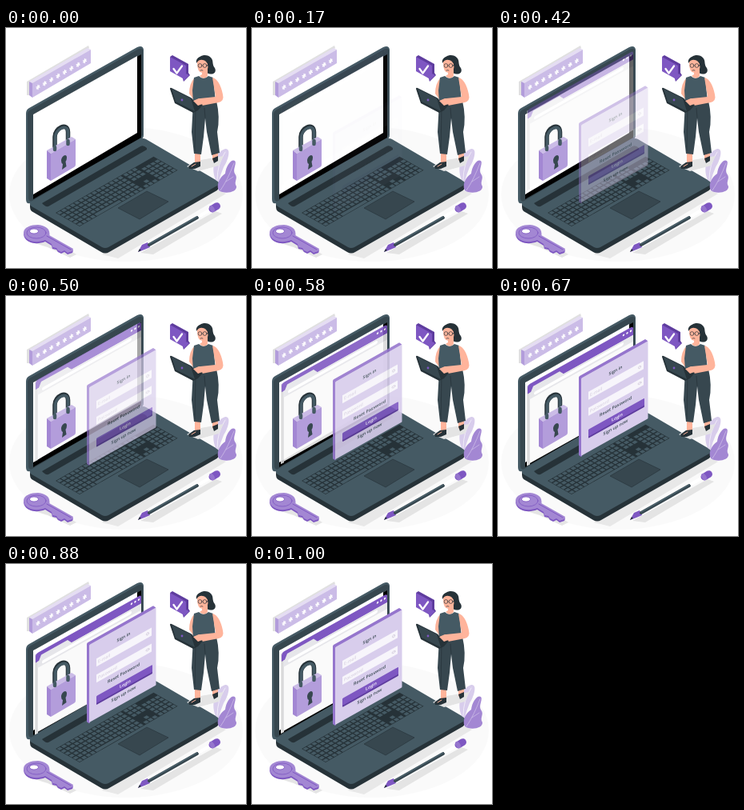
Animation of 300 by 300 pixels, one loop 1.04 s. Source, as an HTML page:

```html
<!DOCTYPE html>
<html lang="en">
<head>
<meta charset="utf-8">
<title>Secure sign in</title>
<style>
html, body { margin: 0; width: 100%; height: 100%; overflow: hidden; background: #fff; }
svg { display: block; width: 100vw; height: 100vh; }
text { font: 600 5.3px "Open Sans", Arial, sans-serif; text-anchor: middle; fill: #37474f; }
text.hint { font-weight: 400; text-anchor: start; fill: #d0c8da; }
.p { fill: #7e57c2; } .m { fill: #b39ddb; } .l { fill: #d8cdec; }
.g { fill: #455a64; } .d { fill: #37474f; } .k { fill: #263238; }
.s { fill: #ffb49b; } .w { fill: #fff; }
.line { fill: none; stroke-linecap: round; stroke-linejoin: round; }
</style>
</head>
<body>
<svg viewBox="0 0 300 300">
  <ellipse cx="150" cy="208" rx="146" ry="84" fill="#fafafa"/>

  <!-- password bar -->
  <path d="M26 67L103 22L104 25L29 84H26Z" fill="#e0e0e0"/>
  <path d="M29 67L102 25L106 27L33 69Z" fill="#e5ddf3"/>
  <path class="m" d="M29 67L33 69V87L29 84Z"/>
  <path d="M33 69L106 27V44L33 87Z" fill="#cbbce7"/>
  <g id="stars" class="line" stroke="#fff" stroke-width="1.3"></g>

  <!-- laptop -->
  <path d="M120 283L262 202L275 207L140 288Z" fill="#e8e8e8"/>
  <path class="k" d="M30 218L124 274L266 193V199Q266 202 262 204L129 280Q124 283 119 280L32 229Q30 227 30 224Z"/>
  <path class="g" d="M31 218L168 139Q171 137 175 139L264 191Q268 194 264 197L128 274Q124 276 120 274L32 223Q28 220 31 218Z"/>
  <path class="k" d="M45 219L168 148Q172 146 176 150L176 152L53 223Q49 224 45 219Z"/>
  <g transform="matrix(5.42 -3.11 5 2.85 62 231)">
    <rect class="k" width="22.600" height="6"/>
    <path id="keys" class="g"/>
  </g>
  <path class="d" d="M140 225L176 204L203 217L167 239Z" stroke="#263238" stroke-width=".6"/>
  <path class="g" d="M25 107Q25 102 29 100L164 24Q171 21 172 27V134Q172 138 168 140L33 218Q25 222 25 214Z"/>
  <path class="d" d="M27 108Q27 104 31 102L166 26Q171 24 171 29V134L33 216Q29 218 28 213Z"/>
  <path d="M34 108L169 33V137L34 214Z" fill="#000"/>
  <path class="w" d="M34 108L164 35V131L34 208Z"/>

  <!-- browser window -->
  <g id="page">
    <path d="M36 112L40 111V210L36 212Z" fill="#e0e0e0"/>
    <g transform="matrix(1 -.56 0 1 37 111)">
      <path d="M2 2H132V99H2Z" fill="#fafafa"/>
      <path d="M2 10V99" class="line" stroke="#c4c4c8" stroke-width=".7"/>
      <path class="p" d="M0 3Q0 0 3 0H129Q132 0 132 3V11H0Z"/>
      <path d="M2 11H4L7 5H40L45 11H132V19H2Z" fill="#e6e6ea"/>
      <rect class="w" x="8" y="13" width="112" height="4" rx="2"/>
      <g class="w"><circle cx="120" cy="4.500" r="1.200"/><circle cx="124.500" cy="4.500" r="1.200"/><circle cx="129" cy="4.500" r="1.200"/></g>
    </g>
  </g>

  <!-- padlock -->
  <path class="line" d="M61 150V136C61 125 77 117 77.500 130V144" stroke="#263238" stroke-width="5.500"/>
  <path class="line" d="M61.500 150V136C62 126 77 119 77.500 130V144" stroke="#455a64" stroke-width="3.600"/>
  <path d="M51 153L82 136L87 139L56 157Z" fill="#cbbce7"/>
  <path d="M51 153L56 157V191L51 188Z" fill="#a387d3"/>
  <path class="m" d="M56 157L87 139V171Q87 173 85 174L56 191Z"/>
  <path class="line" d="M61 149V152M77.500 141V145" stroke="#455a64" stroke-width="4.500"/>
  <path class="d" d="M69 166C69 160 76 156 76 162Q76 165 74.500 167L75.500 173L70 177L71 170Q69 169 69 166Z"/>

  <!-- sign in panel -->
  <g id="panel">
    <path fill="#9575cd" d="M101 103Q101 102 102 101L184 55L187 57V59L105 106V201L104 202L101 200Z"/>
    <g transform="matrix(1 -.56 0 1 104 104)">
      <rect class="l" width="83.500" height="97" rx="1"/>
      <text x="43" y="16">Sign in</text>
      <rect x="9" y="22" width="69" height="10" fill="#f7f5fb"/>
      <rect x="9" y="42" width="69" height="10" fill="#f7f5fb"/>
      <text class="hint" x="11" y="29">E-mail</text>
      <text class="hint" x="11" y="49">Password</text>
      <g class="line" stroke="#d0c8da" stroke-width=".7"><circle cx="73" cy="27" r="1.500"/><ellipse cx="73" cy="47" rx="2" ry="1.200"/></g>
      <text x="43" y="61">Reset Password</text>
      <rect x="9" y="70" width="70" height="10" rx="1" fill="#5e3c9e"/>
      <rect class="p" x="9" y="69" width="70" height="9" rx="1"/>
      <text x="45" y="75.500" style="fill:#fff">Login</text>
      <text x="43" y="87">Sign up now</text>
    </g>
  </g>

  <!-- speech bubble -->
  <path d="M205 36L208 34L228 45V56L230 59L222 67L221 63Z" fill="#5e3c9e"/>
  <path class="p" d="M205 36L225 47V57L229 59L222 66L221 63L205 54Z"/>
  <path class="line" d="M209.500 51L213.500 56.500L220 47.500" stroke="#fff" stroke-width="2.300"/>

  <!-- plant -->
  <path d="M263 191C255 178 261 155 274 151C282 150 278 165 272 174Q268 183 266 192Z" fill="#d8cdec"/>
  <path class="line" d="M264 190Q264 170 274 155" stroke="#fff" stroke-width=".6"/>
  <path d="M266 203C262 195 268 186 274 182C275 172 282 163 286 166C289 169 283 177 286 182C291 188 284 192 288 198C289 206 272 208 266 203Z" fill="#a387d3"/>
  <path class="line" d="M268 203Q277 190 285 169M275 192L284 186" stroke="#d8cdec" stroke-width=".6"/>

  <!-- woman -->
  <path d="M226 173L238 166L272 160L266 172L240 179Z" fill="#e4e4e4"/>
  <path class="s" d="M236 153H243V170L237 174H230L236 169ZM258 152H265V164L261 168L258 165Z"/>
  <path class="k" d="M228 173L235 168L243 167V173L236 176H229ZM258 163L265 160V166L260 169Z"/>
  <path class="line" d="M232 173L237 170" stroke="#ffb49b" stroke-width="1"/>
  <path class="d" d="M234 93L263 91Q268 112 264 130L267 156L257 159L251 130L249 113L247 136L244 158L235 157L232 130Z"/>
  <path class="line" d="M249 112L248 100M237 99L236 154" stroke="#263238" stroke-width=".7"/>
  <path class="s" d="M236 62Q229 69 229 82L234 89L239 85Z"/>
  <path class="k" d="M239 42C240 33 252 32 256 37C260 41 257 45 261 50C264 56 258 60 251 56Z"/>
  <path class="s" d="M245 52H252V60Q248 66 242 60L245 58Z"/>
  <path class="s" d="M239 44C239 37 251 36 252 44Q254 55 247 56Q239 57 239 44Z"/>
  <path class="k" d="M238 44C236 36 248 32 254 41L253 47Q250 40 246 40Q241 39 238 44Z"/>
  <g class="line" stroke="#263238" stroke-width=".7"><circle cx="242.500" cy="47" r="2.400"/><circle cx="248.500" cy="47" r="2.400"/><path d="M251 47L254 46M243 53Q245 52 246 53"/></g>
  <path class="g" d="M235 62L241 60Q247 66 253 60L259 62L262 92L234 94L233 78Z"/>
  <path class="s" d="M258 62Q267 64 271 83Q273 91 266 93L245 97L238 96L235 91L243 88L262 86Z"/>
  <path class="k" d="M205 76Q205 74 207 75L231 87Q233 88 234 90L246 96L240 103L234 106L211 94Z"/>
  <path class="d" d="M207 76L231 88L236 104L212 92Z"/>
  <circle class="p" cx="220" cy="90" r="1.400"/>
  <path class="s" d="M234 91L241 88L249 89L248 94L240 97Z"/>

  <!-- key -->
  <path d="M26 266L52 274L80 287L88 283L56 263Z" fill="#e5e5e5"/>
  <path d="M22 258C22 251 31 247 40 247C50 248 56 254 54 261L84 278L83 281L77 283L73 280L69 282L65 280L63 277L58 276L57 272L49 267C37 272 23 268 22 258Z" fill="#7e57c2"/>
  <path d="M22 256C22 249 31 246 40 246C50 247 56 252 54 259L84 276L83 279L77 281L73 278L69 280L65 278L63 275L58 274L57 270L49 265C37 270 23 266 22 256Z" fill="#a387d3"/>
  <ellipse class="line" cx="38" cy="256" rx="12" ry="7" stroke="#7e57c2" stroke-width=".8"/>
  <ellipse class="w" cx="35" cy="254" rx="5.500" ry="3" stroke="#7e57c2" stroke-width=".8"/>
  <path class="line" d="M51 260L81 277" stroke="#7e57c2" stroke-width="1"/>

  <!-- pencil -->
  <path d="M168 281L262 229L270 232L184 283Z" fill="#e4e4e4"/>
  <path class="p" d="M165 280L170 271L177 268L180 274L173 277Z"/>
  <path class="k" d="M165 280L167 276L169 278Z"/>
  <path class="line" d="M179 271L239 237" stroke="#37474f" stroke-width="4"/>
  <path class="line" d="M179 270L239 236" stroke="#546e7a" stroke-width="1"/>
  <path class="line" d="M242 235L254 228" stroke="#fff" stroke-width="4"/>
  <path class="line" d="M258 226L263.500 222.700" stroke="#7e57c2" stroke-width="9"/>
  <ellipse cx="257.500" cy="226" rx="2.800" ry="4.500" fill="#9575cd" transform="rotate(-30 257.500 226)"/>
</svg>
<script>
const $ = id => document.getElementById(id);
const LOOP = 1040, FPS = 24;

// Eight asterisks along the password bar
let d = '';
for (let i = 0; i < 8; i++) {
  const x = 40 + i * 8.35, y = 74 - i * 4.7;
  d += `M${x} ${y - 2.5}v5M${x - 2} ${y - .2}l4 .4M${x - 1.6} ${y + 1.9}l3.2 -3.800`;
}
$('stars').innerHTML = `<path d="${d}"/>`;

// Keyboard: main block, navigation keys, number pad
d = '';
const key = (x, y, w = 1) => d += `M${x + .12} ${y + .14}h${w - .24}v.72h${.24 - w}z`;
for (let row = 0; row < 6; row++) {
  for (let col = 0; col < 15; col++) {
    if (row < 5 || col < 4 || col > 9) key(col, row);
  }
  for (let col = 0; col < 3; col++) {
    if (row < 3 || row === 5 || (row === 4 && col === 1)) key(15.3 + col, row);
  }
  for (let col = 0; col < 4; col++) {
    if (row) key(18.6 + col, row);
  }
}
key(4, 5, 6);
$('keys').setAttribute('d', d);

const bezier = (a, b, s) => 3 * (1 - s) ** 2 * s * a + 3 * (1 - s) * s * s * b + s ** 3;

// Cubic easing that overshoots before it settles
function ease(t) {
  let lo = 0, hi = 1;
  for (let i = 0; i < 24; i++) {
    const mid = (lo + hi) / 2;
    if (bezier(.55, .45, mid) < t) lo = mid; else hi = mid;
  }
  return bezier(-.1, 1.55, lo);
}

function slide(id, from, p) {
  $(id).setAttribute('transform', `translate(0 ${from * (1 - p)})`);
  $(id).setAttribute('opacity', Math.max(0, Math.min(1, p)));
}

// Steps at 24 per second; the small lead absorbs clock rounding
function draw() {
  const t = performance.now() % LOOP / 1000;
  const step = Math.min(FPS, Math.floor(t * FPS + .1));
  const p = ease(step / FPS);
  slide('page', -15, p);
  slide('panel', 30, p);
  requestAnimationFrame(draw);
}
draw();
</script>
</body>
</html>
```
